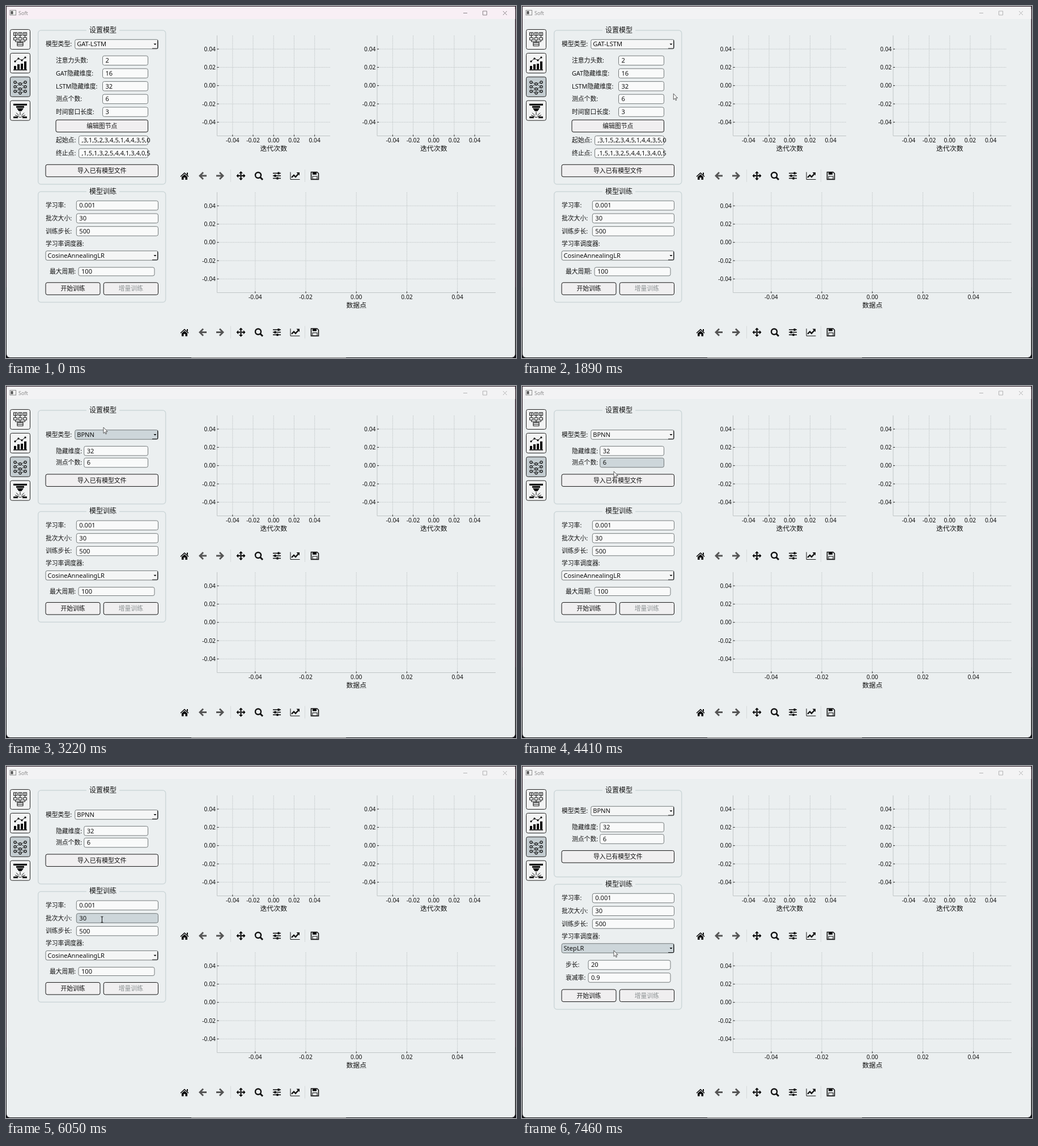
Animation of 900 by 622 pixels, one loop 8000 ms. Source, as an HTML page:

```html
<!DOCTYPE html>
<html lang="zh-CN">
<head>
<meta charset="utf-8">
<style>
html, body { margin: 0; width: 100%; height: 100%; overflow: hidden; background: #241420; }
svg { display: block; font-family: "Noto Sans", "Noto Sans CJK SC", "Noto Sans CJK", sans-serif; }
text { white-space: pre; fill: #111; }
.line { fill: none; stroke: #111; }
.thick { stroke-width: 2.4; }
.field { fill: #f9fafa; stroke: #666c6e; stroke-width: .9; }
.button { fill: #f0eff0; stroke: #151515; }
.combo { fill: #f5f6f6; stroke: #666c6e; stroke-width: .9; }
.group { fill: none; stroke: #cdd7d9; stroke-width: 1.5; }
.grid { stroke: #c3c8c9; stroke-width: .8; stroke-dasharray: 2 .6; }
.spine { fill: none; stroke: #c0c5c6; }
.hover { fill: #cdd6da; }
</style>
</head>
<body>
<svg id="stage" width="900" height="622" viewBox="0 0 900 622"></svg>
<script>
const LOOP = 8000, BG = '#ebeff0';
const stage = document.getElementById('stage');

const text = (x, y, s, size = 10.8, anchor = 'start', fill = '#111') =>
  `<text x="${x}" y="${y + size * .36}" font-size="${size}" text-anchor="${anchor}" style="fill:${fill}">${s}</text>`;
const rect = (x, y, w, h, attrs = '') => `<rect x="${x}" y="${y}" width="${w}" height="${h}" ${attrs}/>`;
const path = (d, attrs = 'class="line"') => `<path d="${d}" ${attrs}/>`;
const dot = (x, y, r, attrs = '') => `<circle cx="${x}" cy="${y}" r="${r}" ${attrs}/>`;
const at = (x, y, s) => `<g transform="translate(${x} ${y})">${s}</g>`;

function chart(left, top, width, label) {
  const bottom = top + 177.5, mid = left + width / 2, stepX = width * .1815;
  let grid = '', marks = '';
  for (let i = -2; i <= 2; i++) {
    const x = mid + i * stepX, y = top + 88.7 - i * 32.3, value = (i * .02).toFixed(2);
    grid += `M${x} ${top}V${bottom}M${left} ${y}h${width}`;
    marks += path(`M${x} ${bottom - 2}v3M${left} ${y}h3`, 'stroke="#222"')
      + text(x, bottom + 7.3, value, 10.3, 'middle') + text(left - 2.5, y, value, 10.3, 'end');
  }
  return path(grid, 'class="grid"') + path(`M${left} ${top}V${bottom}h${width}`, 'class="spine"')
    + marks + text(mid, bottom + 22.5, label, 11.9, 'middle');
}

function toolbar(y) {
  const arrow = 'M-7 0L0 -7L2 -5L-1.500 -1.500H7V1.500H-1.500L2 5L0 7Z';
  const head = 'M0 -8L3.500 -4.500H1V-1H-1V-4.500H-3.500Z';
  const heads = [0, 90, 180, 270].map(a => path(head, `transform="rotate(${a})"`)).join('');
  const sliders = [[-4.5, 3], [0, -3], [4.5, 1]].map(([v, h]) =>
    path(`M-7 ${v}H7`, 'class="line" stroke-width="1.6"') + rect(h - 1.5, v - 2, 3, 4)).join('');
  return at(315, y, path('M-7.500 1L0 -6L7.500 1L6.500 2L0 -4L-6.500 2ZM4 -5.500H6V-1L4 -3ZM-5 2L0 -2.500L5 2V7H1.500V3H-1.500V7H-5Z', ''))
    + at(347, y, path(arrow, 'fill="#555"'))
    + at(378, y, path(arrow, 'fill="#555" transform="scale(-1 1)"'))
    + at(414.5, y, heads + rect(-1, -1, 2, 2))
    + at(446, y, dot(-1, -1, 5, 'class="line thick"') + path('M2.500 2.500L7 7', 'class="line" stroke-width="3"'))
    + at(478, y, sliders)
    + at(510, y, path('M-8 -6.500V6.500H8.500') + path('M-6 3L-2 -1L1 2L6 -3.500', 'class="line thick"') + path('M2.500 -6H8V-.5Z', ''))
    + at(545, y, path('M-6.500 -6.500H4L6.500 -4V6.500H-6.500Z', 'class="line" stroke-width="1.6"')
      + rect(-4, -6, 7, 4) + rect(-4, 1, 8, 5, 'class="line"'))
    + path(`M396.500 ${y - 11}v22M527.500 ${y - 11}v22`, 'stroke="#d6dadb"');
}

function sidebar() {
  let out = '';
  for (let i = 0; i < 4; i++)
    out += rect(7.5, 41.5 + i * 41.9, 35, 35, `rx="3" stroke="#222" fill="${i == 2 ? '#c3ccd0' : '#f2f3f3'}"`);

  let tree = '';
  for (const x of [-8.5, 0, 8.5])
    tree += rect(x - 3, -12, 6, 5, 'class="line"') + path(`M${x} -7v4M${x} -12v5`)
      + rect(x - 3, -3, 6, 4, 'class="line"');
  tree += path('M-8.500 1v3H8.500V1M0 1v5') + rect(-5, 5.5, 10, 3, 'class="line"') + rect(-5, 8.5, 10, 3, 'class="line"');

  let bars = path('M-12 12H12', 'class="line" stroke-width="1.6"');
  [6, 9, 10, 14].forEach((h, i) => { bars += rect(-11 + i * 6, 11 - h, 4, h); });
  const peaks = [[-9, -3], [-3, -8], [3, -5], [9, -10]];
  bars += path('M' + peaks.join('L')) + peaks.map(([x, y]) => dot(x, y, 1.6)).join('');

  const nodes = [[-9, -8], [-9, 0], [-9, 8], [0, -5], [0, 4], [0, 11], [9, -8], [9, 0], [9, 8]];
  let links = '';
  for (const a of nodes) for (const b of nodes)
    if (b[0] - a[0] == 9 && Math.abs(a[1] - b[1]) < 10) links += `M${a}L${b}`;
  const net = path(links, 'class="line" stroke-width=".7"')
    + nodes.map(([x, y]) => dot(x, y, 2.1, 'fill="#c3ccd0" stroke="#111" stroke-width="1.3"')).join('');

  const nozzle = path('M-12 -12H12V-9H-12ZM-7 -8H7V-5H-7ZM-6 -4H6L2.500 1H-2.500Z', '')
    + path('M0 2V8M-2 9L-7 4M2 9L7 4M-4 10L-9 8M4 10L9 8') + path('M-12 12H-4M4 12H12', 'class="line" stroke-width="3"')
    + path('M-4 10Q0 14 4 10');

  [tree, bars, net, nozzle].forEach((icon, i) => { out += at(25, 59 + i * 41.9, icon); });
  return out;
}

// Form panels: 0 GAT-LSTM, 1 BPNN, 2 MultiStepLR, 3 StepLR
function form(state) {
  const widgets = [];
  let out = '';
  const box = (kind, x, right, y, h) => {
    widgets.push({ kind, x, y: y - h / 2, right, bottom: y + h / 2 });
    out += rect(x, y - h / 2, right - x, h, `rx="3" class="${kind} widget"`);
  };
  const field = (label, lx, x, right, y, value, h = 16.5) => {
    out += text(lx, y, label);
    box('field', x, right, y, h);
    out += text(x + 5, y, value, 11.1);
  };
  const button = (x, right, y, label, fill) => {
    box('button', x, right, y, 21.5);
    out += text((x + right) / 2, y, label, 10.8, 'middle', fill);
  };
  const combo = (x, y, value) => {
    box('combo', x, 268.5, y, 16.5);
    out += text(x + 3.5, y, value, 11.1) + path(`M260.500 ${y - 1}h5l-2.500 2.500Z`, '')
      + path(`M258 ${y + 7.5}H267.500V${y - 7}`, 'class="line" stroke-width=".9"');
  };
  const group = (top, bottom, title) => {
    out += rect(56.7, top, 225, bottom - top, 'rx="5" class="group"')
      + rect(142, top - 3, 58, 6, `fill="${BG}"`) + text(171, top - .7, title, 12, 'middle');
  };

  const gat = state == 0, steps = state > 1;
  const top = gat ? 328 : steps ? 209 : 221.7;
  group(43, gat ? 315 : steps ? 196 : 208.5, '设置模型');
  const comboY = gat ? 67.5 : steps ? 79.5 : 86;
  out += text(70, comboY, '模型类型:');
  combo(121.7, comboY, gat ? 'GAT-LSTM' : 'BPNN');
  if (gat) {
    [['注意力头数:', 2], ['GAT隐藏维度:', 16], ['LSTM隐藏维度:', 32], ['测点个数:', 6], ['时间窗口长度:', 3]]
      .forEach(([label, value], i) => field(label, 88, 170.5, 250.5, 96.3 + i * 22.7, value));
    button(88, 250.5, 212, '编辑图节点');
    field('起始点:', 88, 128.5, 250.5, 237.5, ',3,1,5,2,3,4,5,1,4,4,3,5,0', 16);
    field('终止点:', 88, 128.5, 250.5, 260, ',1,5,1,3,2,5,4,4,1,3,4,0,5', 16);
    button(70, 268.5, 291, '导入已有模型文件');
  } else {
    field('隐藏维度:', 88, 137.7, 250.5, comboY + 28.7, 32);
    field('测点个数:', 88, 137.7, 250.5, comboY + 49.5, 6);
    button(70, 268.5, comboY + 80.7, '导入已有模型文件');
  }

  group(top, top + (steps ? 221 : 195.5), '模型训练');
  [['学习率:', '0.001'], ['批次大小:', 30], ['训练步长:', 500]]
    .forEach(([label, value], i) => field(label, 70, 124.3, 268.5, top + 24.5 + i * 22.7, value));
  out += text(70, top + 91.8, '学习率调度器:');
  combo(70, top + 113, ['CosineAnnealingLR', 'CosineAnnealingLR', 'MultiStepLR', 'StepLR'][state]);
  if (steps) {
    field('步长:', 77, 117, 262, top + 142.5, state == 2 ? 30 : 20);
    field('衰减率:', 77, 117, 262, top + 165, state == 2 ? '0.1' : '0.9');
  } else field('最大周期:', 77, 128, 262, top + 141.3, 100, 15);
  const last = top + (steps ? 196.7 : 171.5);
  button(70, 166, last, '开始训练');
  button(172.3, 268.5, last, '增量训练', '#8b9192');
  return { out, widgets };
}

const forms = [0, 1, 2, 3].map(form);
stage.innerHTML = rect(0, 497, 900, 125, 'fill="#101014"') + rect(327, 620, 273, 2, 'fill="#777"')
  + rect(1, 1, 897.5, 620, `rx="6" fill="${BG}"`) + path('M1 23V1H898.500V23Z', 'id="bar"')
  + rect(7, 7.5, 10.5, 8.5, 'fill="#fafafa" stroke="#888"') + rect(8.5, 9, 4, 5.5, 'fill="#555"')
  + text(22, 12.3, 'Soft', 9, 'start', '#888')
  + path('M807 12.500h7M841.500 9h7v7h-7ZM877 9l7 7m0 -7l-7 7', 'id="controls" fill="none" stroke-width=".9"')
  + sidebar() + chart(372.5, 52, 199.5, '迭代次数') + chart(655, 52, 199.5, '迭代次数')
  + chart(372.5, 329, 491.5, '数据点') + toolbar(300) + toolbar(576.5)
  + forms.map(f => `<g class="form">${f.out}</g>`).join('')
  + path('M0 0V10.500L2.400 8.400L4 12L5.500 11.300L4 7.700H7.200Z', 'id="arrow" fill="#fff" stroke="#333" stroke-width=".8"')
  + path('M-2 -5H2M0 -5V5M-2 5H2', 'id="beam" class="line"');

const panels = [...stage.querySelectorAll('.form')];
panels.forEach((p, i) => p.querySelectorAll('.widget').forEach((el, k) => { forms[i].widgets[k].el = el; }));
const [bar, controls, arrow, beam] = ['bar', 'controls', 'arrow', 'beam'].map(id => document.getElementById(id));

// Pointer path: time, x, y
const track = [
  [490, 876, 571], [600, 336, 352], [740, 336, 352], [1430, 268, 156], [1860, 268, 156],
  [1890, 267.5, 155], [2420, 172, 73], [3530, 172, 73], [3870, 165, 137], [4380, 165, 137],
  [4410, 162, 150], [4480, 165, 211], [4690, 165, 211], [4860, 118, 160], [4950, 108, 137],
  [5030, 92, 147], [5130, 67, 170], [5370, 170, 267], [5540, 170, 267], [5570, 170, 268],
  [6020, 170, 268], [6050, 169.5, 271], [6270, 162, 335], [7120, 162, 335], [7260, 162, 326], [LOOP, 162, 326]
];

function pointer(t) {
  const i = track.findIndex(k => k[0] > t);
  if (i < 1) return null;
  const a = track[i - 1], b = track[i], u = (t - a[0]) / (b[0] - a[0]);
  return [a[1] + (b[1] - a[1]) * u, a[2] + (b[2] - a[2]) * u];
}

const stateAt = t => t < 3220 ? 0 : t < 6820 ? 1 : t < 7460 ? 2 : 3;

function hit(t) {
  const p = pointer(t);
  return p ? forms[stateAt(t)].widgets.findIndex(w => p[0] >= w.x && p[0] <= w.right && p[1] >= w.y && p[1] <= w.bottom) : -1;
}

// Hover lags the pointer and survives a layout change until the next move.
const hoverTime = t => t >= 3220 && t < 3560 ? 3219 : t >= 6820 && t < 7150 ? 6819 : t - 30;

const mix = (a, b, u) => `rgb(${a.map((v, i) => Math.round(v + (b[i] - v) * u))})`;

function frame() {
  const t = performance.now() % LOOP, state = stateAt(t);
  const fade = Math.min(1, Math.max(0, (t - 20) / 140));
  bar.setAttribute('fill', mix([248, 239, 245], [243, 243, 244], fade));
  controls.setAttribute('stroke', mix([125, 120, 124], [172, 172, 173], fade));
  panels.forEach((p, i) => { p.style.display = i == state ? '' : 'none'; });
  const hovered = hit(hoverTime(t));
  forms[state].widgets.forEach((w, i) => w.el.classList.toggle('hover', i == hovered));

  const p = pointer(t), under = hit(t);
  const typing = under >= 0 && forms[state].widgets[under].kind == 'field';
  arrow.style.display = p && !typing ? '' : 'none';
  beam.style.display = p && typing ? '' : 'none';
  if (p) for (const c of [arrow, beam]) c.setAttribute('transform', `translate(${p})`);
  requestAnimationFrame(frame);
}
frame();
</script>
</body>
</html>
```
